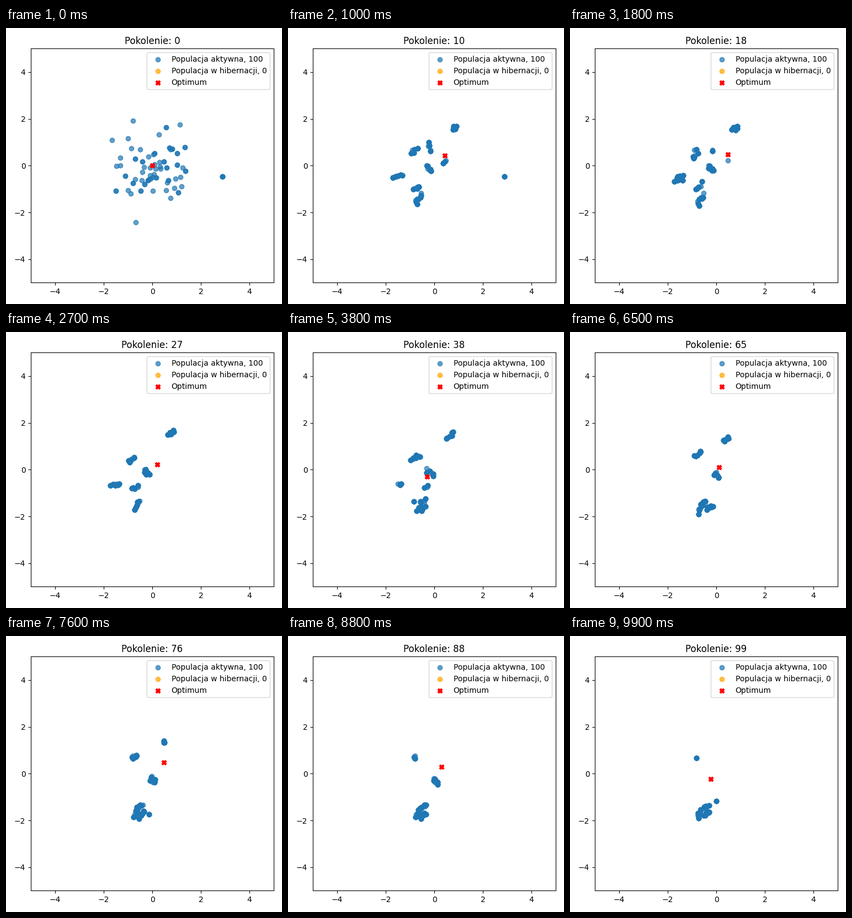
Animation of 500 by 500 pixels, one loop 10 s. Source, as a matplotlib script:

```python
import random

import matplotlib.pyplot as plt
import numpy as np
from matplotlib.animation import FuncAnimation

GENERATIONS = 100
KEYS = (0, 10, 27, 49, 65, 88, 99)
JITTER = 0.035

# members, spread along x and y, first key, centre at each key
NICHES = [
    (1, 0, 0, 0, [(2.89, -.46), (2.89, -.46)]),
    (6, .10, .06, 1, [(.85, 1.65), (.75, 1.57), (.63, 1.40), (.42, 1.30)]),
    (7, .11, .10, 1, [(-.87, .61), (-.86, .44), (-.70, .52), (-.73, .66)]),
    (4, .03, -.05, 5, [(-.81, .67)]),
    (1, 0, 0, 6, [(-.81, .67)]),
    (5, .08, -.19, 1, [(-.21, .78)]),
    (7, .08, -.12, 1, [(-.24, -.12), (-.25, -.11), (-.12, -.15),
                       (.02, -.23), (.06, -.34)]),
    (1, 0, 0, 6, [(0, -1.17)]),
    (3, .06, .01, 1, [(.42, .16)]),
    (8, .15, .06, 1, [(-1.53, -.44), (-1.53, -.65)]),
    (6, .12, .05, 1, [(-.76, -.93), (-.73, -.76), (-.38, -1.32),
                      (-.52, -1.40), (-.45, -1.41), (-.42, -1.42)]),
    (8, .09, .17, 1, [(-.66, -1.42), (-.60, -1.48), (-.57, -1.58),
                      (-.65, -1.64), (-.69, -1.67), (-.68, -1.68)]),
    (7, .10, .10, 3, [(-.40, -1.68), (-.28, -1.62), (-.47, -1.78),
                      (-.40, -1.70)]),
]

rng = random.Random(11)
history = [[] for _ in range(GENERATIONS)]


def jump(k):
    """Random generation between two keys; early losses are the fastest."""
    span = KEYS[k + 1] - KEYS[k]
    return KEYS[k] + 1 + int((span - 1) * rng.random() ** (1 if k else 2))


def timeline(values, first):
    """Hold each value until a sudden mutation to the next one."""
    line = [values[0]] * GENERATIONS
    for k, value in enumerate(values[1:], first):
        at = jump(k)
        line[at:] = [value] * (GENERATIONS - at)
    return line


def live(xs, ys, birth, death, copies):
    for gen in range(birth, death):
        history[gen] += [(xs[gen], ys[gen])] * copies


def add_initial(count):
    while count:
        x, y = rng.gauss(-0.1, 1), rng.gauss(-0.05, 1)
        if -1.95 < x < 2.15 and -2.55 < y < 2.1:
            live([x] * GENERATIONS, [y] * GENERATIONS, 0, jump(0),
                 rng.choice((1, 1, 2)))
            count -= 1


def add_niche(size, dx, dy, first, path):
    last = first + len(path) - 1
    jitter = JITTER if size > 1 else 0
    for i in range(size):
        side = 2 * i / (size - 1) - 1 if size > 1 else 0
        xs = timeline([x + dx * side + rng.gauss(0, jitter)
                       for x, _ in path], first)
        ys = timeline([y + dy * side + rng.gauss(0, jitter)
                       for _, y in path], first)
        birth = jump(first - 1) if first else 0
        death = GENERATIONS
        if last < len(KEYS) - 1:
            span = KEYS[last + 1] - KEYS[last]
            death = KEYS[last] + 1 + int(span * i / size)
        live(xs, ys, birth, death, 1 if rng.random() < 0.25 else 6)


add_initial(61)
for niche in NICHES:
    add_niche(*niche)

fig, ax = plt.subplots(figsize=(5, 5), dpi=100)
ax.set_xlim(-5, 5)
ax.set_ylim(-5, 5)
active = ax.scatter([], [], color="tab:blue", alpha=0.7,
                    label="Populacja aktywna, 100")
ax.scatter([], [], color="orange", alpha=0.7,
           label="Populacja w hibernacji, 0")
optimum = ax.scatter([0], [0], color="red", marker="X", label="Optimum")
ax.legend(loc="upper right")
title = ax.set_title("Pokolenie: 0")
fig.tight_layout()


def update(gen):
    active.set_offsets(history[gen])
    shift = 0.5 * np.sin(0.1 * gen)
    optimum.set_offsets([(shift, shift)])
    title.set_text(f"Pokolenie: {gen}")
    return active, optimum, title


anim = FuncAnimation(fig, update, frames=GENERATIONS, interval=100,
                     repeat=True, repeat_delay=0)
plt.show()
```
